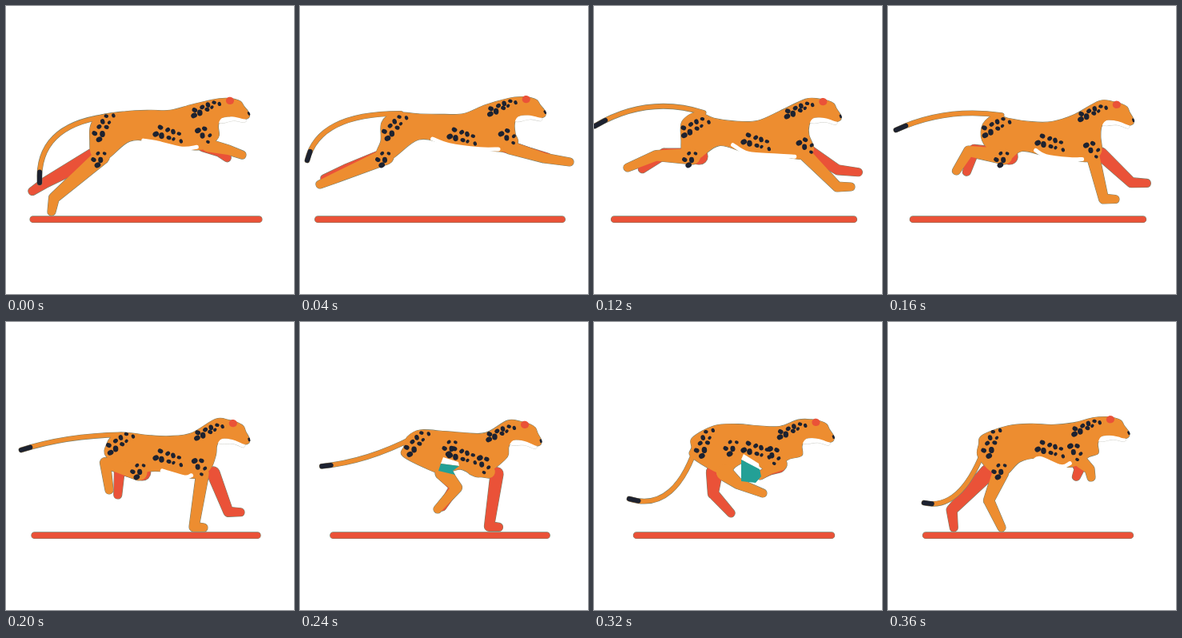
Write an HTML page with a canvas that moves like this. It is 360x360 px and loops after 400 ms.

```html
<!DOCTYPE html>
<html lang="en">
<head>
<meta charset="utf-8">
<title>Running cheetah</title>
<style>
  html, body { margin: 0; width: 100%; height: 100%; overflow: hidden; background: #fff; }
  canvas { display: block; width: 360px; height: 360px; }
</style>
</head>
<body>
<canvas id="stage" width="360" height="360"></canvas>
<script>
const ctx = document.getElementById('stage').getContext('2d');
const STEP = 40, STEPS = 10;
const ORANGE = '#ed8d30', RED = '#ea5238', DARK = '#1d2230', TEAL = '#23a096', EDGE = '#7c806a';

// Key points of the stride: step, then x, y of the ankle and of the paw.
const hindStride = [
  [0, 60,240, 57,257], [1, 46,214, 25,223], [3, 78,187, 42,202], [5, 124,176, 129,210],
  [6, 196,207, 172,234], [8, 180,202, 211,214], [9, 126,223, 142,257]
];
const foreStride = [
  [0, 278,180, 295,186], [1, 305,190, 337,195], [3, 304,226, 321,226], [5, 235,256, 247,257],
  [6, 222,187, 215,186], [8, 220,184, 208,192], [9, 252,184, 254,194]
];
// Step, then x, y of the bend and of the tip.
const tailSwing = [
  [0, 38,150, 42,221], [1, 23,134, 9,193], [3, 67,111, 1,150],
  [5, 75,142, 19,160], [8, 103,240, 44,221], [9, 95,238, 45,226]
];

// Offsets from the ear.
const head = [[-22,-1], [-5,-3], [6,-2], [14,1], [18,7], [23,13], [25,17], [24,21], [19,23], [10,21], [0,20], [-10,22], [-14,31], [-13,43]];
const muzzle = [[-14,27], [-10,22], [0,20], [10,20], [19,22], [19,27], [5,25], [-8,28]];

const lerp = (a, b, u) => a + (b - a) * u;

function wave(step, mean, swing, peak) {
  return mean + swing * Math.cos((step - peak) / STEPS * 2 * Math.PI);
}

// Position between the key points, around the loop.
function track(keys, step) {
  const s = (step + STEPS) % STEPS;
  const i = keys.findLastIndex(key => key[0] <= s);
  const a = keys[i], b = keys[(i + 1) % keys.length];
  const u = (s - a[0]) / ((b[0] - a[0] + STEPS) % STEPS);
  const [x1, y1, x2, y2] = a.map((v, k) => lerp(v, b[k], u)).slice(1);
  return [[x1, y1], [x2, y2]];
}

function place(points, [x, y], angle) {
  const c = Math.cos(angle), s = Math.sin(angle);
  return points.map(([px, py]) => [x + px * c - py * s, y + px * s + py * c]);
}

// Smooth curve through all points.
function curve(points, closed = false) {
  const n = points.length, path = new Path2D();
  const at = i => points[closed ? (i + n) % n : Math.max(0, Math.min(n - 1, i))];
  path.moveTo(...at(0));
  for (let i = 0; i < (closed ? n : n - 1); i++) {
    const [p, a, b, q] = [at(i - 1), at(i), at(i + 1), at(i + 2)];
    path.bezierCurveTo(
      a[0] + (b[0] - p[0]) / 6, a[1] + (b[1] - p[1]) / 6,
      b[0] - (q[0] - a[0]) / 6, b[1] - (q[1] - a[1]) / 6, b[0], b[1]);
  }
  if (closed) path.closePath();
  return path;
}

function polygon(points) {
  const path = new Path2D();
  points.forEach(point => path.lineTo(...point));
  path.closePath();
  return path;
}

// Chain of tapered capsules.
function limb(joints, radii) {
  const path = new Path2D();
  for (let i = 0; i + 1 < joints.length; i++) {
    const [[x1, y1], [x2, y2]] = joints.slice(i, i + 2);
    const [r1, r2] = radii.slice(i, i + 2);
    const dx = x2 - x1, dy = y2 - y1, dir = Math.atan2(dy, dx);
    const open = Math.acos(Math.max(-1, Math.min(1, (r1 - r2) / Math.hypot(dx, dy))));
    const part = new Path2D();
    part.arc(x1, y1, r1, dir + open, dir - open + 2 * Math.PI);
    part.arc(x2, y2, r2, dir - open, dir + open);
    part.closePath();
    path.addPath(part);
  }
  return path;
}

const knee = s => [wave(s, 143, 37, 6.4), 188];
const elbow = s => [wave(s, 249, 18, 2.2), wave(s, 182, 8, 4.6)];
const hindLeg = s => limb([knee(s), ...track(hindStride, s)], [10, 6.5, 5]);
const foreLeg = s => limb([elbow(s), ...track(foreStride, s)], [8, 6, 5]);

function fill(path, color) {
  ctx.fillStyle = color;
  ctx.fill(path);
}

function stroke(path, color, width) {
  ctx.strokeStyle = color;
  ctx.lineWidth = width;
  ctx.stroke(path);
}

// Two staggered rows of spots that get smaller along the rows.
function drawSpots(center, angle, count, length, width) {
  ctx.fillStyle = DARK;
  for (let k = 0; k < count; k++) {
    const along = lerp(-length, length, k / (count - 1)) + Math.sin(k * 5);
    const across = (k % 2 ? -width : width) + Math.sin(k * 3);
    const [[x, y]] = place([[along, across]], center, angle);
    const r = lerp(3.6, 2, k / count) + .4 * Math.sin(k * 4);
    ctx.beginPath();
    ctx.ellipse(x, y, r * 1.1, r * .9, k - .5, 0, 2 * Math.PI);
    ctx.fill();
  }
}

function drawTail(base, s) {
  const [bend, end] = track(tailSwing, s);
  const path = new Path2D(), tip = new Path2D();
  path.moveTo(...base);
  path.quadraticCurveTo(...bend, ...end);
  const u = .9;
  const tipStart = base.map((v, k) => lerp(lerp(v, bend[k], u), lerp(bend[k], end[k], u), u));
  tip.moveTo(...tipStart);
  tip.lineTo(...end);
  stroke(path, EDGE, 6.8);
  stroke(path, ORANGE, 5.6);
  stroke(tip, DARK, 6);
}

// Opening between the folded legs, u from 0 to 1.
function drawOpening(u) {
  const x = 176 + 8 * u;
  const left = [x, 177 - 5 * u], right = [x + 23, 180 + 4 * u];
  fill(polygon([[x + 3, 169 - 4 * u], [x + 22, 175 + 2 * u], right, left]), '#fff');
  fill(polygon([left, right, [x + 25 - 5 * (1 - u) * 2, 186 + 7 * u],
    [x + 18, 191 + 10 * u], [x - 3 + 3 * u, 186 + 13 * u]]), TEAL);
}

function draw(s) {
  const ear = [wave(s, 281.5, 4.5, 3.2), wave(s, 122.5, 6, 6.3)];
  const tilt = wave(s, .1, .1, 5.5);
  const [kneeX] = knee(s), [elbowX, elbowY] = elbow(s);
  const rump = [wave(s, 126, 10, 5), wave(s, 138.5, 7, 7.2)];
  const rearX = wave(s, 115, 14, 6.2);
  const groin = [kneeX / 2 + 95, wave(s, 178, 11, 6)];
  const belly = [
    [lerp(groin[0], elbowX, 1 / 3), wave(s, 179, 9, 4.5)],
    [lerp(groin[0], elbowX, 2 / 3), wave(s, 186, 8, 5.3)]
  ];
  const back = [
    rump, [150, wave(s, 135, 5.5, 3.5)], [180, wave(s, 136, 9, 3.6)],
    [205, wave(s, 136.5, 8, 3.9)], [232, wave(s, 131, 8, 5.4)]
  ];
  const body = curve([
    ...back, ...place(head, ear, tilt),
    [elbowX + 10, elbowY - 6], [elbowX - 5, elbowY + 5], belly[1], belly[0], groin,
    [kneeX + 6, 192], [kneeX - 12, 187], [rearX, 168], [rearX + 1, rump[1] + 12]
  ], true);

  // The far hind leg leads the near one, the far foreleg follows.
  const far = [hindLeg(s + wave(s, .5, .25, 0)), foreLeg(s - wave(s, .85, .45, 4.2))];
  const near = [body, hindLeg(s), foreLeg(s)];
  const half = wave(s, 139, 15, 2.4) + wave(2 * s, 0, 4, 2);
  const ground = limb([[175 - half, 266.7], [175 + half, 266.7]], [3.8, 3.8]);
  const jaw = curve(place(muzzle, ear, tilt), true);

  ctx.fillStyle = '#fff';
  ctx.fillRect(0, 0, 360, 360);
  ctx.lineCap = ctx.lineJoin = 'round';

  for (const path of [ground, ...far, ...near]) stroke(path, EDGE, 1.2);
  stroke(jaw, '#c9c9c2', 1);
  for (const path of [ground, ...far]) fill(path, RED);
  fill(jaw, '#fff');
  drawTail([rump[0] + 8, rump[1] + 1], s);
  near.forEach(path => fill(path, ORANGE));

  const tuck = Math.max(0, wave(s, 0, 1, 7)) ** 2;
  drawSpots([rearX + 17, 150], wave(s, -.8, .35, 3.5), 9, 17, 4.5);
  drawSpots([kneeX - 4 + 18 * tuck, 190 - 52 * tuck], -1, 5, 8, 4);
  drawSpots([204, wave(s, 165, 6, 4)], .3, 9, 16, 5);
  drawSpots([wave(s, 246, 22, 2.3), wave(s, 170, 10, 4.9)], wave(s, 1, .4, 7), 5, 9, 4);
  drawSpots([ear[0] - 30, ear[1] + 9], -.4, 9, 17, 3);

  if (s < 6 || s > 8) {
    stroke(curve([[groin[0] + 17, groin[1] - 1], ...belly, [elbowX - 14, elbowY + 2]]), '#fff', 5);
  } else {
    drawOpening((s - 6) / 2);
  }

  fill(limb([ear, [ear[0] + 1, ear[1]]], [4.7, 4.5]), RED);
  const nose = place([[23.5, 15], [24.5, 17]], ear, tilt);
  fill(limb(nose, [1.3, 1.3]), DARK);
}

function tick() {
  draw(Math.floor(performance.now() / STEP) % STEPS);
  requestAnimationFrame(tick);
}
tick();
</script>
</body>
</html>
```
